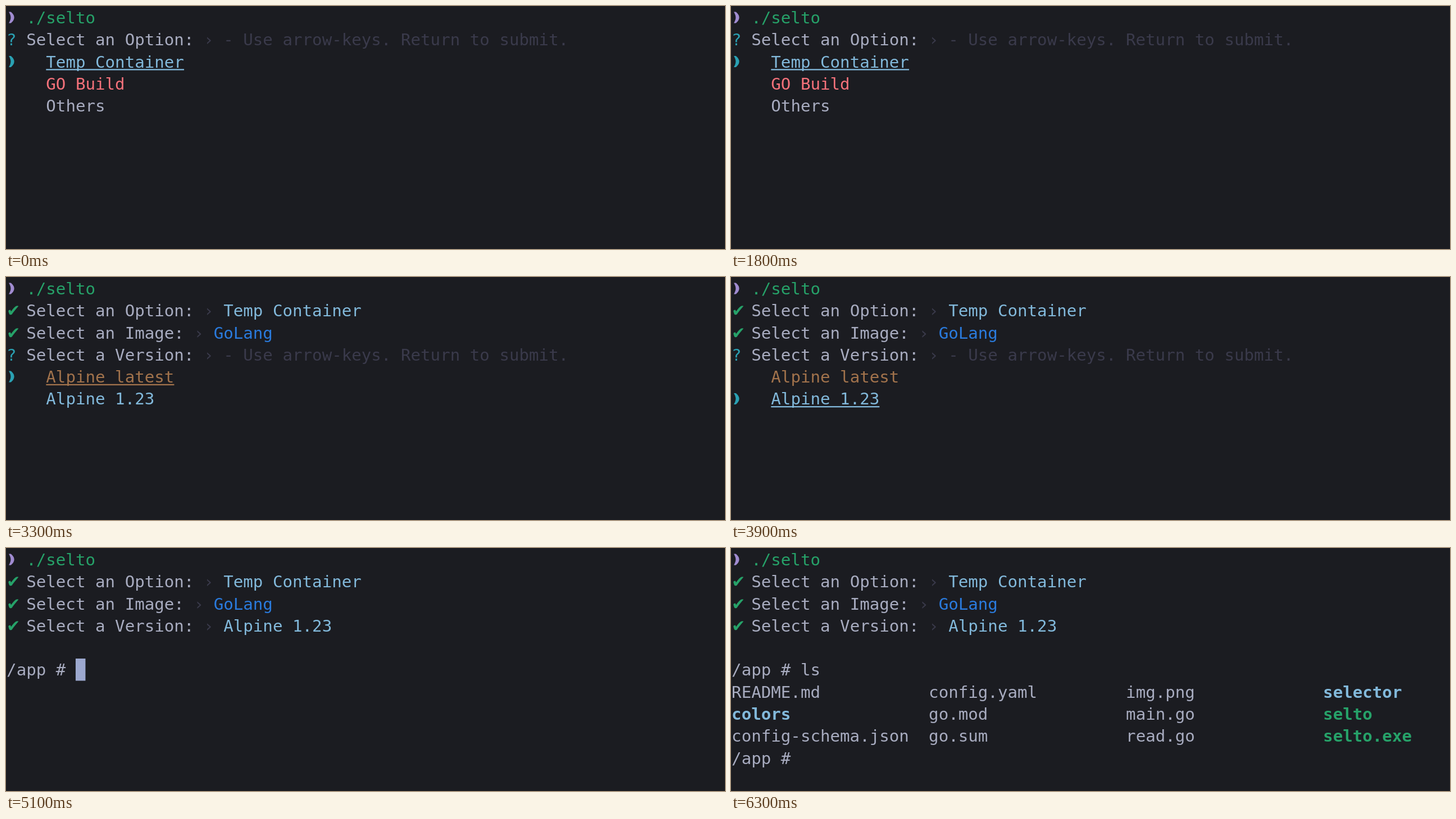
These frames come from a looping animation (1280 px wide and 433 px high, 7200 ms). An HTML page:

```html
<!DOCTYPE html>
<html lang="en">
<head>
<meta charset="utf-8">
<style>
  html, body { margin: 0; height: 100%; overflow: hidden; background: #1b1c21; }
  svg { display: block; width: 100vw; height: 100vh; }
  text { font: 29.15px "DejaVu Sans Mono", monospace; white-space: pre; }
  .bold { font-weight: bold; }
  .check { font-family: "DejaVu Sans", sans-serif; }
</style>
</head>
<body>
<svg id="screen" viewBox="0 0 1280 433"></svg>
<script>
const CELL = 17.55, LINE = 39.28, LEFT = 1.1, BASE = 31, LOOP = 7200;
const C = {
  text: '#a8acc0', dim: '#3a3a4b', green: '#26a269', sky: '#82b9db', red: '#f6727b',
  blue: '#2a7bde', brown: '#a2734c', cyan: '#2aa1b3', purple: '#a08bd0', cursor: '#9ca8cf'
};
const prompts = [
  ['Select an Option:', [['Temp Container', C.sky], ['GO Build', C.red], ['Others', C.text]]],
  ['Select an Image:', [['GoLang', C.blue], ['Linux', C.green]]],
  ['Select a Version:', [['Alpine latest', C.brown], ['Alpine 1.23', C.sky]]]
];
const answers = [0, 0, 1];
const listing = [
  ['README.md', 'config.yaml', 'img.png', 'selector'],
  ['colors', 'go.mod', 'main.go', 'selto'],
  ['config-schema.json', 'go.sum', 'read.go', 'selto.exe']
];
const boldColors = { selector: C.sky, colors: C.sky, selto: C.green, 'selto.exe': C.green };

const px = col => LEFT + col * CELL;
const text = (row, col, str, color = C.text, cls = '') =>
  `<text x="${px(col)}" y="${Math.round(BASE + row * LINE)}" fill="${color}" class="${cls}">${str}</text>`;
const rect = (x, y, w, h, color) =>
  `<rect x="${x}" y="${y}" width="${w}" height="${h}" fill="${color}"/>`;
const chevron = (row, color) =>
  `<path transform="translate(0 ${row * LINE})" fill="${color}"
    d="M5 10.5H8.8Q14.6 15.5 14.6 20.5Q14.6 25.5 8.8 30.5H5Q8.4 25 8.4 20.5Q8.4 16 5 10.5Z"/>`;
const cursor = x => rect(x, 197, 17.5, 39.5, C.cursor);

function question(row, str) {
  return text(row, 2, str) + text(row, str.length + 3, '›', C.dim);
}

function answered(count) {
  return prompts.slice(0, count).map(([str, options], i) => {
    const [label, color] = options[answers[i]];
    return text(i + 1, 0, '✔', C.green, 'check') + question(i + 1, str) +
      text(i + 1, str.length + 5, label, color);
  }).join('');
}

function menu(index, selected) {
  const [str, options] = prompts[index], row = index + 1;
  const items = options.map(([label, color], i) => {
    const r = row + 1 + i;
    const mark = i === selected
      ? chevron(r, C.cyan) + rect(px(4), 112.2 + (r - 2) * LINE, label.length * CELL, 2.3, color)
      : '';
    return mark + text(r, 4, label, color);
  });
  return answered(index) + text(row, 0, '?', C.cyan) + question(row, str) +
    text(row, str.length + 5, '- Use arrow-keys. Return to submit.', C.dim) + items.join('');
}

function files() {
  return listing.map((names, r) => names.map((name, c) =>
    text(6 + r, c * 20, name, boldColors[name], boldColors[name] ? 'bold' : '')
  ).join('')).join('');
}

const shell = () => answered(3) + text(5, 0, '/app # ');
const steps = [
  [0, () => menu(0, 0)],
  [600, () => menu(0, 1)],
  [1200, () => menu(0, 2)],
  [1800, () => menu(0, 0)],
  [2400, () => menu(1, 0)],
  [3300, () => menu(2, 0)],
  [3900, () => menu(2, 1)],
  [4500, () => answered(3) + cursor(11)],
  [5100, () => shell() + cursor(px(7))],
  [5700, () => shell() + text(5, 7, 'ls')],
  [6300, () => shell() + text(5, 7, 'ls') + files() + text(9, 0, '/app #')]
];

const screen = document.getElementById('screen');
let shown;
function frame() {
  const t = performance.now() % LOOP;
  const step = steps.findLast(([start]) => t >= start);
  if (step !== shown) {
    shown = step;
    screen.innerHTML = chevron(0, C.purple) + text(0, 2, './selto', C.green) + step[1]();
  }
  requestAnimationFrame(frame);
}
frame();
</script>
</body>
</html>
```
